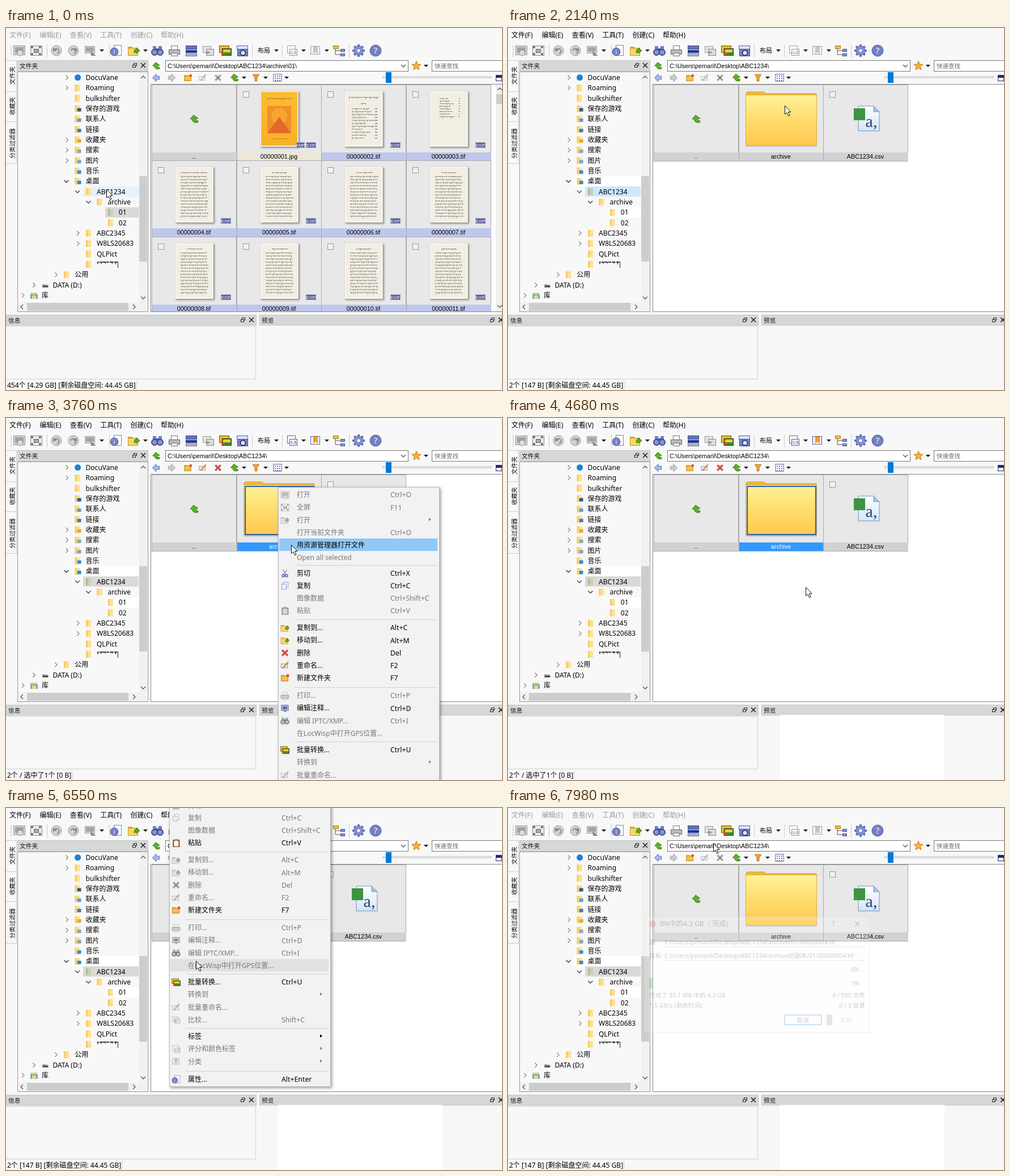
An HTML page with a canvas for the animation above (8000 ms loop, 875 by 640 pixels).

```html
<!DOCTYPE html>
<html lang="zh">
<head>
<meta charset="utf-8">
<title>File browser</title>
<style>
html, body { margin: 0; width: 100%; height: 100%; overflow: hidden; background: #f7f7f7 }
canvas { display: block }
</style>
</head>
<body>
<canvas id="stage" width="875" height="640"></canvas>
<script>
const g = document.getElementById('stage').getContext('2d');
const UI = '"Noto Sans","Noto Sans CJK SC",sans-serif';
const LABEL = '"Liberation Sans","Noto Sans CJK SC",sans-serif';
const LOOP = 8000;

// [time, cursor x, cursor y, forced menu row]
const steps = [
  [0, 177, 285], [930, 177, 285], [1480, 300, 245], [1600, 430, 200], [1720, 478, 186],
  [1870, 505, 162], [2020, 498, 149], [2140, 488, 137], [2260, 482, 129], [2540, 481, 124],
  [2820, 481, 124], [2970, 481, 124, 16], [3090, 481, 124], [3490, 491, 151], [3640, 497, 188],
  [3760, 503, 224], [3880, 512, 258], [4000, 520, 284], [4120, 525, 302], [4400, 525, 299],
  [4680, 525, 299], [4830, 500, 294], [4950, 468, 289], [5100, 425, 266], [5220, 386, 249],
  [5370, 350, 253], [5510, 325, 253], [5630, 303, 252], [5760, 289, 252], [6010, 289, 252, 18],
  [6130, 289, 252, 18], [6280, 311, 264, 18], [6430, 325, 268], [6550, 335, 270], [6700, 343, 248],
  [6820, 349, 222], [6940, 352, 197], [7060, 353, 176], [7340, 358, 118], [7460, 362, 85],
  [7610, 362, 68], [7730, 362, 62], [7980, 362, 62]
];

// --- drawing helpers ---
function box(x, y, w, h, fill, stroke) {
  if (fill) { g.fillStyle = fill; g.fillRect(x, y, w, h); }
  if (stroke) { g.strokeStyle = stroke; g.lineWidth = 1; g.strokeRect(x + .5, y + .5, w - 1, h - 1); }
}
function path(points, fill, stroke, width = 1) {
  g.beginPath();
  for (let i = 0; i < points.length; i += 2) g.lineTo(points[i], points[i + 1]);
  if (fill) { g.closePath(); g.fillStyle = fill; g.fill(); }
  if (stroke) { g.strokeStyle = stroke; g.lineWidth = width; g.stroke(); }
}
function disc(x, y, r, fill, stroke, width = 1) {
  g.beginPath();
  g.arc(x, y, r, 0, 7);
  if (fill) { g.fillStyle = fill; g.fill(); }
  if (stroke) { g.strokeStyle = stroke; g.lineWidth = width; g.stroke(); }
}
function text(s, x, y, color = '#000', size = 12, align = 'left', font = UI) {
  g.font = `${size}px ${font}`;
  g.textAlign = align;
  g.fillStyle = color;
  g.fillText(s, x, Math.round(y + size * .36));
}
function fade(y0, y1, ...colors) {
  const f = g.createLinearGradient(0, y0, 0, y1);
  colors.forEach((c, i) => f.addColorStop(i / (colors.length - 1), c));
  return f;
}
function shadowBox(x, y, w, h, fill, stroke, blur) {
  g.save();
  g.shadowColor = '#0006'; g.shadowBlur = blur; g.shadowOffsetX = g.shadowOffsetY = blur && 2;
  box(x, y, w, h, fill);
  g.restore();
  box(x, y, w, h, null, stroke);
}
const caret = (x, y) => path([x - 4, y - 2, x + 4, y - 2, x, y + 2], '#111');
function chevron(x, y, dir, color = '#555') {
  const [dx, dy] = { right: [1, 0], left: [-1, 0], up: [0, -1], down: [0, 1] }[dir];
  path([x - 2 * dx - 4 * dy, y - 2 * dy - 4 * dx, x + 2 * dx, y + 2 * dy,
    x - 2 * dx + 4 * dy, y - 2 * dy + 4 * dx], null, color, 1.3);
}
function random(seed) {
  return () => (seed = (seed * 16807 + 11) % 2147483647) / 2147483647;
}

// --- icons, about 20 px wide, centred on the origin ---
function turn(dir) {
  disc(0, 0, 9, '#d2d2d2', '#999');
  g.beginPath(); g.arc(0, 1, 4.5, 3.4, 7.6); g.strokeStyle = '#888'; g.lineWidth = 2; g.stroke();
  path([-6 * dir, -5, -6 * dir, 2, dir, -1], '#888');
}
function openFolder() {
  box(-10, -7, 8, 4, '#e0a92c'); box(-10, -5, 18, 14, '#f9d766', '#c2912c');
}
const sideArrow = (d, fill, edge) =>
  path([7 * d, 0, 0, -7, 0, -3, -6 * d, -3, -6 * d, 3, 0, 3, 0, 7, 7 * d, 0], fill, edge);
const icons = {
  photo() { box(-10, -9, 21, 17, '#d4d4d4', '#999'); box(-7, -6, 15, 10, '#a2a2a2'); disc(2, 4, 5, '#ddd', '#888'); },
  screen() {
    box(-10, -9, 21, 18, '#eee', '#888'); box(-4, -3, 9, 7, '#aaa', '#666');
    for (const x of [-7, 7]) for (const y of [-6, 6]) disc(x, y, 2, '#666');
  },
  undo() { turn(1); }, redo() { turn(-1); },
  send() { box(-10, -8, 18, 13, '#ddd', '#999'); box(-8, -6, 14, 8, '#a4a4a4'); path([0, 1, 10, 9, 1, 9], '#888'); },
  info() { box(-4, -10, 14, 19, '#fff', '#7b83b8'); disc(-3, 2, 7, '#7580c4', '#525c9c'); text('i', -3, 2, '#fff', 11, 'center'); },
  folderOut() { openFolder(); path([1, 4, 2, -2, 5, -2, 5, -5, 11, 0, 5, 5, 5, 2, 1, 4], '#58ac20', '#377c10'); },
  find() { for (const x of [-5, 5]) { box(x - 3, -8, 6, 7, '#6f7ec4'); disc(x, 3, 5, '#8794d4', '#3c478a', 2); } box(-2, -4, 4, 5, '#4b569a'); },
  print() { box(-6, -9, 12, 8, '#fff', '#777'); box(-10, -2, 20, 9, '#bbb', '#666'); box(-6, 4, 12, 6, '#eee', '#777'); },
  scan() { box(-10, -9, 20, 7, '#6672b8', '#3a4378'); box(-10, -1, 20, 5, '#223a90'); box(-10, 5, 20, 5, '#b8bfd8', '#666'); },
  convert() { box(-10, -8, 15, 12, '#e4e4e4', '#999'); box(-4, -3, 14, 12, '#ddd', '#888'); path([-4, 0, 4, 3, -4, 7], '#999'); },
  pictures() { box(-11, -9, 18, 13, '#e5bd26', '#705b12'); box(-6, -4, 17, 13, '#3d8b34', '#333'); box(-4, -2, 13, 5, '#f4ce38'); path([-7, 1, 1, 5, -7, 9], '#d64c24'); },
  camera() { box(-10, -9, 20, 7, '#dce3fb', '#5865b2'); box(-9, -3, 19, 13, '#7884c8', '#424b88'); disc(1, 4, 4.5, '#dfe5ff', '#343c78', 2); },
  rating() { box(-8, -9, 15, 14, '#fff', '#59639f'); box(-4, -3, 14, 12, '#e9ecff', '#59639f'); text('1-5', 3, 3, '#333', 7, 'center'); },
  tag() { box(-9, -8, 17, 15, '#eef0ff', '#59639f'); box(-4, -7, 8, 12, '#f29b28'); path([-4, 6, 0, 2, 4, 6], '#fff'); },
  tree() {
    path([-6, -4, -6, 7, 3, 7], null, '#556'); path([-6, 0, 3, 0], null, '#556');
    box(-10, -9, 10, 6, '#f0c23c', '#a17c1a'); box(3, -3, 8, 5, '#8593d4', '#4d578f'); box(3, 5, 8, 5, '#8593d4', '#4d578f');
  },
  gear() {
    for (let i = 0; i < 8; i++) { g.rotate(Math.PI / 4); box(-2, -11, 4, 5, '#6674bb'); }
    disc(0, 0, 8, '#8492d5', '#5561a5'); disc(0, 0, 3.5, '#f7f7f7', '#5561a5');
  },
  help() { disc(0, 0, 10, '#7380c5', '#525b98'); text('?', 0, 0, '#fff', 15, 'center'); },
  up() { path([-7, 0, -1, -7, 7, -1, 3, -1, 3, 3, 7, 3, 6, 6, 0, 6, -3, 3, -3, 0], '#5cb51e', '#2e7410'); },
  star() {
    const pts = [];
    for (let i = 0; i < 10; i++) { const r = i % 2 ? 3.6 : 8.5, a = i * Math.PI / 5; pts.push(r * Math.sin(a), -r * Math.cos(a)); }
    path([...pts, 0, -8.5], '#f9b23c', '#c37410');
  },
  left() { sideArrow(-1, '#a9b8ef', '#5a6bb4'); },
  right() { sideArrow(1, '#ccc', '#999'); },
  newFolder() { box(-7, -5, 6, 3, '#d99d28'); box(-7, -4, 13, 10, '#f3c24a', '#b98220'); disc(5, -4, 2.5, '#e4501c'); },
  rename() { box(-7, -3, 12, 8, '#eee', '#8890b8'); path([-4, 5, 6, -6], null, '#d88a25', 2.5); },
  remove() { for (const s of [1, -1]) path([-5, -5 * s, 5, 5 * s], null, '#d4504c', 3.5); },
  funnel() { path([-6, -6, 6, -6, 2, 0, 2, 6, -2, 6, -2, 0], '#f8a22c', '#b4690c'); },
  grid() { box(-8, -7, 16, 14, '#fff', '#4f59a8'); for (let i = 0; i < 9; i++) box(-5 + i % 3 * 4, -4 + (i / 3 | 0) * 4, 2, 2, '#5a67b8'); },
  cut() { path([-5, -9, 3, 4], null, '#8a93b4', 2); path([5, -9, -3, 4], null, '#8a93b4', 2); disc(-4, 6, 3, null, '#5060b0', 2); disc(4, 6, 3, null, '#5060b0', 2); },
  copy() { box(-4, -9, 12, 14, '#fff', '#6c78b4'); box(-8, -5, 12, 14, '#eef', '#6c78b4'); },
  paste() { box(-8, -8, 17, 18, '#8a5a34'); box(-5, -5, 11, 13, '#fff'); box(-3, -10, 7, 4, '#999'); },
  note() { box(-9, -8, 18, 14, '#a9b2e4', '#5661a6'); path([-3, 6, 4, 6, 0, 10], '#5661a6'); box(-5, -4, 10, 6, '#5661a6'); }
};
function icon(name, x, y, off = false, scale = 1) {
  g.save();
  g.translate(x, y);
  g.scale(scale, scale);
  if (off) { g.filter = 'grayscale(1)'; g.globalAlpha *= .6; }
  icons[name]();
  g.restore();
}

// --- toolbars ---
function toolbars(inactive, selected) {
  ['文件(F)', '编辑(E)', '查看(V)', '工具(T)', '创建(C)', '帮助(H)'].forEach((s, i) =>
    text(s, 6 + i * 53.4, 12.5, inactive ? '#999' : '#000'));
  for (let y = 31; y < 50; y += 3) box(8, y, 2, 1, '#aaa');
  for (const x of [72, 182, 434, 487, 605]) box(x, 29, 1, 23, '#ccc');
  const row = { photo: 23, screen: 53, undo: 89, redo: 119, send: 149, info: 194, folderOut: 225, find: 267, print: 297,
    scan: 327, convert: 357, pictures: 387, camera: 417, rating: 504, tag: 546, tree: 587, gear: 622, help: 652 };
  for (const name in row) icon(name, row[name], 40, !selected && (name == 'rating' || name == 'tag'));
  text('布局', 444, 40, '#000', 11);
  for (const x of [169, 246, 477, 525, 566]) caret(x, 40);

  icon('up', 265, 67, false, .9);
  box(281, 57, 429, 20, '#fff', '#777');
  chevron(701, 67, 'down');
  icon('star', 724, 67); caret(741, 67);
  box(751, 57, 130, 20, '#fff', '#777');
  text('快速查找', 756, 67.5, '#666', 10.5);

  const second = { left: 265, right: 292, newFolder: 321, rename: 347, remove: 374, up: 403, funnel: 441, grid: 479 };
  for (const name in second)
    icon(name, second[name], 88, !selected && (name == 'rename' || name == 'remove'), .95);
  for (const x of [420, 458, 495]) caret(x, 88);
  box(664, 85, 193, 4, '#e6e6e6', '#ccc');
  box(670, 78, 10, 19, '#0078d7');
  box(864, 83, 11, 11, '#fff', '#222a70'); box(864, 83, 11, 5, '#222a70');
}

// --- folder tree ---
const tree = ['4>DocuVane', '4>Roaming', '4 bulkshifter', '4 保存的游戏', '4 联系人', '4 链接', '4>收藏夹', '4>搜索', '4>图片',
  '4 音乐', '4v桌面', '5vABC1234', '6varchive', '7 01', '7 02', '5>ABC2345', '5>W8LS20683', '5 QLPict', '5 ', '3>公用',
  '1>DATA (D:)', '0>库'];
function header(x, y, w, title, h = 19) {
  box(x, y, w, h, '#d5d8d6', '#c3c5c3');
  text(title, x + 4, y + h / 2 + .5, '#111', 10.7);
}
function paneButtons(x, y) {
  box(x - 2, y - 4, 6, 5, null, '#222'); box(x - 4, y - 1, 6, 5, '#d5d8d6', '#222');
  for (const s of [1, -1]) path([x + 11, y - 4 * s, x + 19, y + 4 * s], null, '#222', 1.6);
}
function script(x, y, width, next, color, size = 1) {
  for (let end = x + width; x < end;) {
    const w = (1.5 + next() * 3) * size;
    box(x, y, w, size, color);
    box(x + w * next(), y, .8 * size, (1 + next() * 2.6) * size, color);
    x += w + .8 * size;
  }
}
function treeIcon(x, y, i, grey) {
  if (i == 0) return disc(x + 6, y, 5.5, '#1a82d6');
  if (i == 20) { path([x, y, x + 4, y - 2, x + 13, y, x + 9, y + 3], '#aaa'); return box(x + 2, y + 1, 10, 3, '#444'); }
  if (i == 21) { box(x, y - 5, 12, 4, '#f3c94f'); box(x, y - 2, 13, 8, '#5cb0da'); return box(x + 3, y, 7, 6, '#f5d56e'); }
  box(x + 1, y - 6, 9, 12, grey ? '#c9cfae' : '#ffe08c');
  box(x + 1, y - 6, 3, 12, grey ? '#b0ba94' : '#f5cd68');
  if (i > 2 && i < 11) box(x + 5, y - 1, 7, 6, ['#39597c', '#5a9fd8', '#2d7fd0', '#e8a72e', '#8aa6bf', '#78a8c8', '#2a8fe0', '#1e90e8'][i - 3]);
}
function sidebar(t) {
  box(18, 57, 1, 183, '#ccc');
  for (const y of [57, 112, 165, 239]) box(0, y, 19, 1, '#ccc');
  [['文件夹', 84], ['收藏夹', 138], ['分类过滤器', 204]].forEach(([s, y]) => {
    g.save(); g.translate(10.5, y); g.rotate(-Math.PI / 2); text(s, 0, 0, '#111', 10.7, 'center'); g.restore();
  });
  header(20, 57, 231, '文件夹', 20);
  paneButtons(227, 66);
  box(20, 77, 231, 425, '#f8f8f8', '#999');
  box(235, 78, 15, 407, '#f1f1f1'); box(235, 262, 14, 151, '#cdcdcd');
  chevron(242, 87, 'up'); chevron(242, 477, 'down');
  box(21, 485, 228, 16, '#f1f1f1'); box(37, 486, 179, 14, '#cdcdcd');
  chevron(28, 493, 'left'); chevron(226, 493, 'right');

  if (t >= 930) box(176, 317, 58, 18, '#fff');
  if (t >= 1480) box(116, 262, 118, 18, '#fff');
  if (t < 930) { box(136, 280, 98, 18, '#e5f3ff'); box(175, 317, 59, 18, '#d9d9d9'); }
  else box(136, 280, 98, 18, t < 2820 ? '#cce8ff' : '#d9d9d9', t < 1480 && '#99d1ff');

  tree.forEach((row, i) => {
    const x = 63 + 19.4 * row[0], y = 87.5 + 18.35 * i;
    if (row[1] == '>') chevron(x - 33, y, 'right', '#888');
    if (row[1] == 'v') chevron(x - 34, y, 'down', '#333');
    treeIcon(x - 20, y, i, i == (t < 930 ? 13 : 11));
    text(row.slice(2), x, y);
  });
  script(161, 413, 34, random(77), '#222', 1.7);
  box(197, 413, 1, 11, '#222');
}

// --- file list ---
function page(x, y, n) {
  shadowBox(x, y, 68, 99, '#fff', '#dedbd2', 3);
  const next = random(n * 977);
  if (n == 1) {
    box(x + 2, y + 2, 64, 95, fade(y, y + 99, '#fcbc30', '#f8b224'));
    script(x + 13, y + 13, 42, next, '#b8741c');
    box(x + 13, y + 27, 42, 48, '#f0902a');
    disc(x + 34, y + 45, 14, '#f6a62e'); path([x + 13, y + 75, x + 34, y + 46, x + 55, y + 75], '#e26a26');
    script(x + 22, y + 84, 24, next, '#c8801c');
    return;
  }
  box(x + 2, y + 2, 64, 95, '#f2eee3');
  const ink = '#87827a';
  if (n == 2) {
    script(x + 8, y + 11, 52, next, ink); script(x + 29, y + 22, 10, next, ink);
    for (let i = 0; i < 11; i++) { script(x + 13, y + 31 + i * 5.2, 14 + next() * 30, next, ink); box(x + 54, y + 31 + i * 5.2, 4, 1.5, ink); }
  } else if (n == 3) {
    for (let i = 0; i < 8; i++) { script(x + 18, y + 13 + i * 4.6, 15 + next() * 15, next, ink); box(x + 51, y + 13 + i * 4.6, 3, 1, ink); }
  } else {
    script(x + (n == 4 ? 10 : 21), y + 10, n == 4 ? 47 : 26, next, ink);
    for (let i = 0; i < 14; i++) script(x + 10, y + 17 + i * 5.4, 46, next, ink);
  }
}
function badge(s, x, y, w) {
  box(x, y, w, 10, '#565c98', '#9a9fc8');
  text(s, x + w / 2, y + 5, '#fff', 7.5, 'center', LABEL);
}
function cell(i, label, labelFill, labelColor = '#000') {
  const x = Math.round(257 + i % 4 * 149.7), y = Math.round(101 + (i / 4 | 0) * 134.3);
  box(x, y - 1, 150, 136, '#e8e8e8', '#aaa');
  box(x + 1, y + 119, 149, 15, labelFill);
  text(label, x + 74.5, y + 126.5, labelColor, 10.8, 'center', LABEL);
  return [x, y];
}
function parentCell() {
  cell(0, '..', '#d2d2d2');
  icon('up', 332, 161);
}
const checkbox = (x, y) => box(x + 11, y + 11, 11, 11, '#f2f2f2', '#999');
function pages() {
  box(864, 100, 11, 401, '#f0f0f0'); box(865, 117, 10, 17, '#cdcdcd');
  chevron(871, 108, 'up'); chevron(871, 492, 'down');
  parentCell();
  for (let n = 1; n < 12; n++) {
    const name = String(n).padStart(8, '0') + (n == 1 ? '.jpg' : '.tif');
    const [x, y] = cell(n, name, n == 1 ? '#ece7d6' : '#bfc7ec');
    checkbox(x, y);
    page(x + 41, y + 10, n);
    badge('EXIF', x + 122, y + 101, 18);
    if (n == 1) badge('XMP', x + 105, y + 101, 15);
  }
}
function folderCells(selected) {
  parentCell();
  cell(1, 'archive', selected ? '#3399ff' : '#d2d2d2', selected ? '#fff' : '#000');
  const [x, y] = cell(2, 'ABC1234.csv', '#d2d2d2');
  checkbox(x, y);

  path([420, 118, 420, 115, 423, 113, 451, 113, 455, 116, 544, 116, 544, 120, 420, 120], '#f0b936', '#d59b22');
  g.save(); g.shadowColor = '#0004'; g.shadowBlur = 2; g.shadowOffsetY = 1;
  box(420, 118, 124, 90, fade(118, 208, '#fff29a', '#ffdc6c', '#ffc850'));
  g.restore();
  box(419, 118, 126, 90, null, '#e0b04a');
  if (selected) { g.strokeStyle = '#2c5eb4'; g.lineWidth = 2; g.strokeRect(422, 121, 121, 85); }

  path([618, 138, 645, 138, 655, 148, 655, 182, 618, 182, 618, 138], fade(138, 182, '#fff', '#d4e4f7'), '#6f93bd');
  path([645, 138, 645, 148, 655, 148], '#a9c6e6', '#6f93bd');
  text('a,', 641, 164, '#27476c', 30, 'center', '"Liberation Serif",serif');
  box(610, 142, 20, 21, '#3d9441');
}

// --- bottom panes ---
function bottomPanes(t, status) {
  box(0, 502, 875, 138, '#f7f7f7');
  box(255, 501, 620, 1, '#888');
  header(0, 507, 442, '信息'); paneButtons(418, 516);
  header(447, 507, 440, '预览'); paneButtons(858, 516);
  box(-1, 527, 442, 94, '#f8f8f8', '#d0d0d0');
  if (t >= 4680) box(479, 525, 291, 115, '#fff');
  text(status, 2, 632);
  box(g.measureText(status).width + 3, 624, 1, 15, '#ccc');
}

// --- context menu: label | shortcut | icon | selection kinds it works for ---
const groups = [
  [136, '打开|Ctrl+O|photo', '全屏|F11|screen', '打开|>|folderOut', '打开当前文件夹|Ctrl+O', '用资源管理器打开文件|||1', 'Open all selected'],
  [274.5, '剪切|Ctrl+X|cut|1', '复制|Ctrl+C|copy|1', '图像数据|Ctrl+Shift+C', '粘贴|Ctrl+V|paste|2'],
  [371, '复制到...|Alt+C|folderOut|1', '移动到...|Alt+M|folderOut|1', '删除|Del|remove|1', '重命名...|F2|rename|1', '新建文件夹|F7|newFolder|12'],
  [491, '打印...|Ctrl+P|print', '编辑注释...|Ctrl+D|note|1', '编辑 IPTC/XMP...|Ctrl+I|find', '在LocWisp中打开GPS位置...'],
  [587, '批量转换...|Ctrl+U|pictures|12', '转换到|>', '批量重命名...||rename', '比较...|Shift+C|convert'],
  [683, '标签|>||12', '评分和颜色标签|>|rating', '分类|>|tag'],
  [759, '属性...|Alt+Enter|info|12']
];
const menuRows = groups.flatMap(([top, ...items]) => items.map((item, i) => [top + i * 22.1, ...item.split('|')]));
const smallIcons = ['remove', 'rename', 'newFolder'];

function menu(kind, dx, dy, alpha, [, cx, cy, forced]) {
  g.save();
  g.globalAlpha = alpha;
  g.translate(dx, dy);
  // A see-through panel would let its own shadow show, so only the solid one casts it.
  shadowBox(480, 122, 285, 650, '#f2f2f2', '#bbb', alpha < 1 ? 0 : 5);
  for (const [top] of groups.slice(1)) box(509, Math.round(top - 15), 252, 1, '#d0d0d0');
  menuRows.forEach(([y, label, keys = '', glyph, kinds = ''], i) => {
    const on = kinds.includes(kind);
    const hover = forced ? i == forced : cx - dx >= 495 && Math.abs(cy - dy - y) < 11;
    if (hover) box(482, Math.round(y - 11), 279, 22, on && alpha == 1 ? '#90c8f6' : '#e0e2e2');
    if (glyph) icon(glyph, 492, y, !on, smallIcons.includes(glyph) ? 1 : .72);
    text(label, 513, y, on ? '#000' : '#777');
    if (keys == '>') path([746, y - 4, 746, y + 2, 750, y - 1], on ? '#000' : '#888');
    else text(keys, 678, y, on ? '#000' : '#777', 12.3);
  });
  g.restore();
}

function copyDialog() {
  g.save();
  g.globalAlpha = .2;
  box(240, 191, 398, 206, '#f7f7f7', '#e0a080');
  disc(255, 205, 6, '#e04030');
  text('0%中的4.3 GB（ 完成)', 268, 205);
  text('?', 574, 205, '#000', 12, 'center');
  text('×', 616, 205, '#000', 18, 'center');
  [['源:', '/01/00000004.tif', 237], ['目标:', '的副本/01/00000004.tif', 261]].forEach(([s, end, y]) => {
    text(s, 249, y, '#000', 10.7);
    text('C:/Users/pemaril/Desktop/ABC1234/archive' + end, 276, y, '#000', 10.7);
    box(275, y + 8, 355, 1, '#999');
  });
  [['0%', 620, 285], ['1%', 620, 310], ['4 / 590 文件', 630, 331], ['0 / 3 目录', 630, 349]].forEach(([s, x, y]) =>
    text(s, x, y, '#000', 10.7, 'right'));
  text('完成了 30.1 MB 中的 4.3 GB', 249, 331, '#000', 10.7);
  text('1.5 GB/s (剩余时间)', 249, 349, '#000', 10.7);
  box(249, 300, 6, 19, '#0a0');
  g.strokeStyle = '#0078d7'; g.lineWidth = 2; g.strokeRect(488, 366, 65, 17);
  text('取消', 520, 375, '#000', 10.7, 'center');
  box(562, 365, 10, 19, '#888');
  text('关闭', 585, 375, '#777', 10.7);
  g.restore();
}

function cursor(x, y) {
  g.save();
  g.translate(x + .5, y + .5);
  path([0, 0, 0, 15, 3.5, 12, 6, 18, 8.5, 17, 6, 11, 10.5, 11, 0, 0], '#fff', '#111');
  g.restore();
}

function draw(step) {
  const [t, x, y] = step;
  const selected = t >= 2820 && t < 6010;
  const folder = t >= 930;
  box(0, 0, 875, 640, '#f8f8f8');
  toolbars(!folder || t >= 7980, selected);
  text('C:\\Users\\pemaril\\Desktop\\ABC1234\\' + (folder ? '' : 'archive\\01\\'), 285, 67.5, '#000', 10.8, 'left', LABEL);
  sidebar(t);
  box(255, 99, 630, 403, '#fff', '#888');
  if (folder) folderCells(selected); else pages();
  bottomPanes(t, selected ? '2个 / 选中了1个 [0 B]'
    : (folder ? '2个 [147 B]' : '454个 [4.29 GB]') + ' [剩余磁盘空间: 44.45 GB]');
  if (t >= 2970 && t < 4680) menu('1', 0, 0, t < 3090 ? .8 : 1, step);
  if (t >= 6010 && t < 7980) menu('2', -192, -279, t < 6130 ? .8 : 1, step);
  if (t >= 7980) copyDialog();
  cursor(x, y);
}

let shown;
function tick() {
  const t = performance.now() % LOOP;
  const step = steps.findLast(s => s[0] <= t);
  if (step != shown) draw(shown = step);
  requestAnimationFrame(tick);
}
tick();
</script>
</body>
</html>
```
